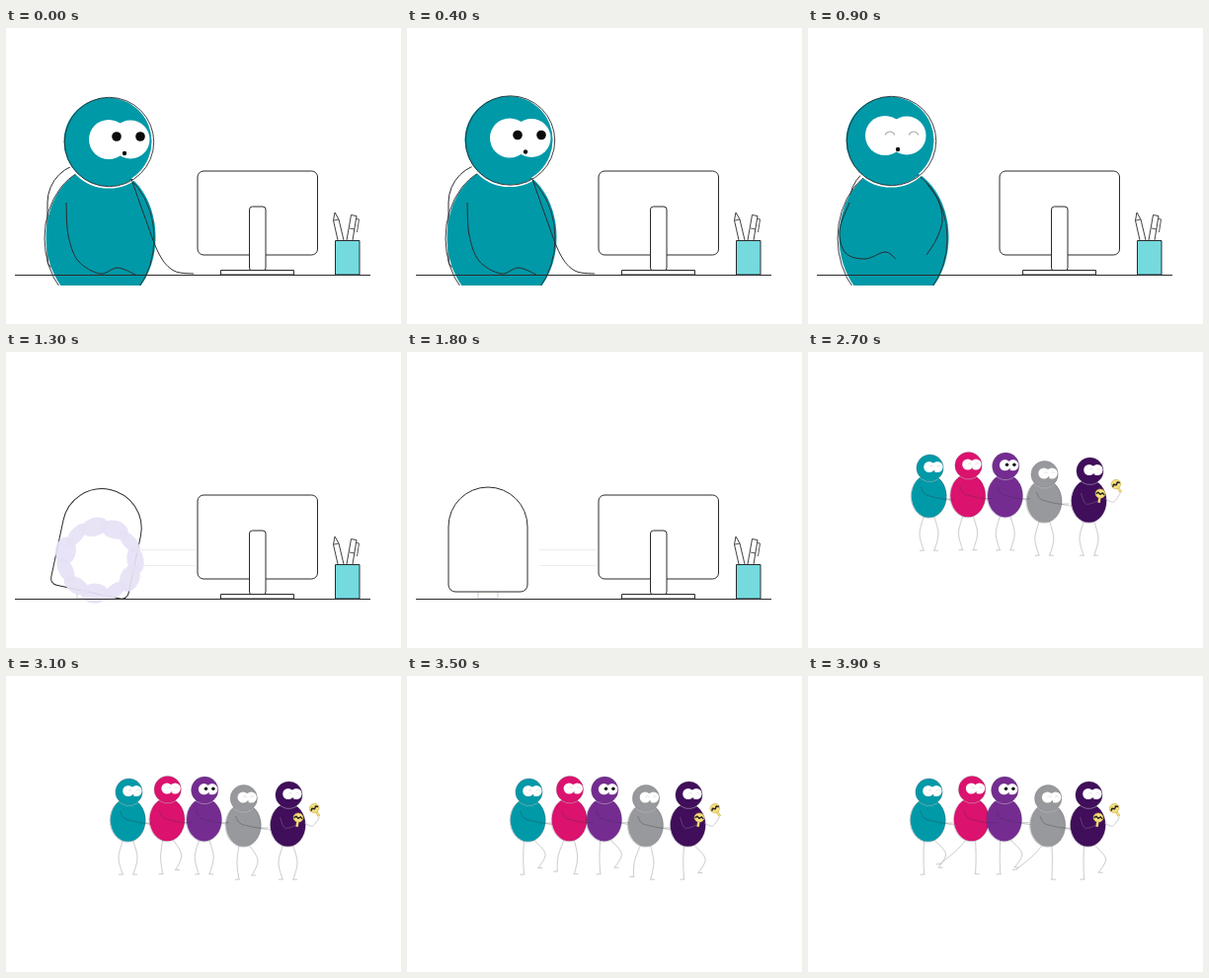
An HTML page with a canvas for the animation above (4000 ms loop, 400x300 px).

```html
<!DOCTYPE html>
<html lang="en">
<head>
<meta charset="utf-8">
<title>Conga break</title>
<style>
  html, body { margin: 0; width: 100%; height: 100%; overflow: hidden; background: #fff; }
  canvas { display: block; width: 400px; height: 300px; }
</style>
</head>
<body>
<canvas id="stage" width="400" height="300"></canvas>
<script>
const ctx = document.getElementById('stage').getContext('2d');
const LOOP = 4000, STEP = 100;
const INK = '#2b2b2e', TEAL = '#0099a8';

const clamp = v => Math.max(0, Math.min(1, v));
const ease = (t, from, to) => { const p = clamp((t - from) / (to - from)); return p * p * (3 - 2 * p); };
const mix = (a, b, p) => a + (b - a) * p;
const mixPoints = (a, b, p) => a.map((q, i) => [mix(q[0], b[i][0], p), mix(q[1], b[i][1], p)]);

function paint(fill, stroke, width = 1) {
  if (fill) { ctx.fillStyle = fill; ctx.fill(); }
  if (stroke) { ctx.strokeStyle = stroke; ctx.lineWidth = width; ctx.stroke(); }
}
function oval(x, y, rx, ry, fill, stroke, width) {
  ctx.beginPath();
  ctx.ellipse(x, y, rx, ry, 0, 0, Math.PI * 2);
  paint(fill, stroke, width);
}
const dot = (x, y, r, fill, stroke, width) => oval(x, y, r, r, fill, stroke, width);
function box(x, y, w, h, r, fill, stroke) {
  ctx.beginPath();
  ctx.roundRect(x, y, w, h, r);
  paint(fill, stroke);
}
function lines(points, stroke, width, fill) {
  ctx.beginPath();
  points.forEach(p => ctx.lineTo(...p));
  paint(fill, stroke, width);
}
// Smooth line through all points
function curve(points, stroke, width) {
  const at = i => points[Math.max(0, Math.min(points.length - 1, i))];
  ctx.beginPath();
  ctx.moveTo(...points[0]);
  for (let i = 0; i < points.length - 1; i++) {
    const [a, b, c, d] = [at(i - 1), at(i), at(i + 1), at(i + 2)];
    ctx.bezierCurveTo(b[0] + (c[0] - a[0]) / 6, b[1] + (c[1] - a[1]) / 6,
      c[0] - (d[0] - b[0]) / 6, c[1] - (d[1] - b[1]) / 6, ...c);
  }
  paint(null, stroke, width);
}
function lid(x, y, r, color, width) {
  ctx.beginPath();
  ctx.arc(x, y, r, Math.PI * 1.1, Math.PI * 1.9);
  paint(null, color, width);
}

function drawChair(t) {
  const swing = t < 1300 ? 12 * ease(t, 1000, 1200)
    : 12 * Math.exp((1300 - t) / 150) * Math.cos((t - 1300) / 200 * Math.PI);
  box(72, 240, 20, 10, 1, '#fff', '#c9c9d2');
  ctx.save();
  ctx.translate(82, 250);
  ctx.rotate(swing * Math.PI / 180);
  box(-40, -113, 80, 106, [40, 40, 7, 7], '#fff', INK);
  ctx.restore();
}

const ARMS = {
  rest: [[[61, 177], [63, 210], [73, 236], [95, 249], [113, 243], [131, 250]],
         [[127, 153], [140, 190], [155, 229], [170, 246], [190, 249]]],
  lean: [[[42, 177], [32, 205], [38, 228], [58, 234], [78, 227], [89, 234]],
         [[120, 157], [132, 175], [136, 195], [130, 214], [120, 230]]]
};

function drawWorker(t) {
  const lean = ease(t, 600, 900);
  ctx.save();
  ctx.beginPath();
  ctx.rect(0, 0, 400, 261);
  ctx.clip();
  ctx.translate(-170 * clamp((t - 1000) / 200) ** 1.4, 0);

  const bx = 96 - 9 * lean;
  oval(bx, 212, 55.5, 72, TEAL);
  oval(bx - 1.5, 213, 55.5, 72, null, INK, .9);

  const hx = 103 - 20 * lean, hy = 115 - lean - 2 * Math.sin(Math.PI * clamp(t / 600)) ** 2;
  dot(hx + 1, hy + 1, 45.5, null, '#fff', 2);
  dot(hx, hy, 44.5, TEAL);
  dot(hx + 1.5, hy + .5, 45.2, null, INK, .9);

  const ex = hx + 1 - 6 * lean, ey = hy - 2 - 3 * lean;
  dot(ex, ey, 20, '#fff');
  dot(ex + 22, ey, 19.5, '#fff');
  for (const x of [ex + 8, ex + 32]) {
    if (lean > .5) lid(x - 3, ey + 1, 5, '#aaa', 1.2);
    else dot(x, ey - 3, 4.8, '#0b0b0b');
  }
  dot(ex + 16 - 3 * lean, ey + 14, 2.2, '#111');

  ARMS.rest.forEach((arm, i) => curve(mixPoints(arm, ARMS.lean[i], lean), INK, 1));
  ctx.restore();
}

function drawPuff(t) {
  const age = (t - 1300) / 100, count = 11;
  const size = 1 - .25 * Math.max(0, age);
  if (size <= 0) return;
  ctx.save();
  ctx.globalAlpha = .92 * size;
  for (let i = 0; i < count; i++) {
    const a = i / count * Math.PI * 2, spread = 1 + .06 * age;
    ctx.beginPath();
    ctx.ellipse(95 + 36 * spread * Math.cos(a), 211 + 34 * spread * Math.sin(a),
      14 * size, (8.5 + 2 * Math.sin(i * 2.4)) * size, a + 1.4, 0, Math.PI * 2);
    paint('#e6e1f5');
  }
  ctx.restore();
}

function drawDesk() {
  lines([[9, 250.5], [369, 250.5]], INK, 1);
  box(194, 145, 121.5, 85, 6, '#fff', INK);
  box(246.5, 181, 16.5, 65, 3, '#fff', INK);
  box(217.5, 245.5, 74, 4.5, 0, '#fff', INK);
  lines([[336, 215], [331.5, 195], [333, 187], [337, 194], [342, 215]], INK, .9, '#fff');
  lines([[332, 195], [337, 194]], INK, .8);
  lines([[345, 215], [349.5, 189.5], [355, 190.5], [351, 215]], INK, .9, '#fff');
  lines([[348, 203], [353, 204]], INK, .8);
  lines([[355, 193], [357.5, 194], [355.5, 207]], INK, .8);
  box(334, 216, 24, 34, 0, '#74dade');
  box(333.5, 215.5, 24.5, 34.5, 0, null, INK);
}

function drawOffice(t) {
  drawChair(t);
  if (t < 1200) drawWorker(t);
  else {
    for (const y of [200.5, 216.5]) lines([[134, y], [192, y]], '#ececef', 1);
    drawPuff(t);
  }
  drawDesk();
}

const LEGS = {
  stand: [[5, 20], [9.5, 38], [5.5, 55]],
  straight: [[4, 20], [4.5, 38], [4, 55]],
  raise: [[6, 20], [18, 34], [11, 48]],
  kick: [[5, 20], [16, 32], [32, 45]]
};
// beat: time of a right-leg lift; walks: strides forward and ends on a left kick, others sway
const DANCERS = [
  { x: 122.5, y: 146, color: TEAL, head: [1, -28.5], beat: 2450, enters: true },
  { x: 162, y: 145.5, color: '#dc126f', head: [.5, -30.5], beat: 2250, walks: true },
  { x: 199.7, y: 145.7, color: '#752c91', head: [.5, -30], beat: 2450, awake: true },
  { x: 239.3, y: 151, color: '#97999c', head: [.3, -27], beat: 2250, walks: true },
  { x: 284.5, y: 151, color: '#400e5b', head: [1, -30.5], beat: 2450, leader: true }
];
const THIN = '#bdbdc2', EDGE = 'rgba(50, 50, 60, .4)';

function placeX(d, t) {
  const move = d.walks ? .003 * (t - 2700) : Math.sin((t - 2700) / 800 * Math.PI);
  return d.x + move - (d.enters ? 130 * (1 - clamp((t - 2400) / 300)) : 0);
}

function drawLeg(side, points) {
  const p = points.map(([x, y]) => [x * side, y]), foot = p[2];
  curve(p, THIN, .8);
  lines([[foot[0] - side, foot[1]], [foot[0] + 4 * side, foot[1] + .3]], THIN, .8);
}

function drawMaraca(x, y, angle) {
  ctx.save();
  ctx.translate(x, y);
  ctx.rotate(angle);
  lines([[0, 3], [0, 9.5]], '#c2a850', 2.6);
  lines([[0, 3], [0, 9]], '#f6df7c', 1.8);
  oval(0, 0, 5, 4.6, '#f6df7c', '#c2a850', .5);
  lines([[-4.2, .8], [-2.2, -1], [0, .8], [2.2, -1], [4.2, .8]], '#222', 1.4);
  ctx.restore();
}

function drawDancer(d, t) {
  const finale = ease(t, 3400, 3700);
  const lift = Math.max(0, Math.cos((t - d.beat) / 500 * Math.PI));
  const right = d.walks ? lift * (1 - finale) : Math.max(lift, finale);
  const left = d.walks ? finale : 0;

  ctx.save();
  ctx.translate(placeX(d, t), d.y);
  drawLeg(-1, mixPoints(mixPoints(LEGS.stand, LEGS.straight, right), LEGS.kick, left));
  drawLeg(1, mixPoints(mixPoints(LEGS.stand, LEGS.straight, left), LEGS.raise, right));
  if (!d.leader) curve([[12, 0], [20, 4], [28, 5]], THIN, .7);

  oval(0, 0, 17.8, 21.8, d.color);
  oval(-.3, .3, 18, 21.9, null, EDGE, .6);
  const [hx, hy] = d.head;
  dot(hx, hy, 13.6, d.color);
  dot(hx, hy, 13.7, null, EDGE, .6);
  ctx.beginPath();
  ctx.arc(hx, hy, 14, .6, Math.PI - .6);
  paint(null, 'rgba(255, 255, 255, .5)', .7);

  for (const x of [hx - .7, hx + 7.5]) dot(x, hy - 1, 5.6, '#fff');
  for (const x of [hx + 1.3, hx + 8.7]) {
    if (d.awake) dot(x, hy - 1.5, 1.7, '#111');
    else lid(x, hy - .5, 1.8, '#c6c6ca', .5);
  }
  dot(hx + 4.2, hy + 3, .7, '#777');

  if (d.leader) {
    const shake = Math.sin(t / 400 * Math.PI);
    curve([[-8, -8], [-3, 3], [9, 0]], '#77608a', .6);
    curve([[17, -2], [25, 1], [32, -8]], THIN, .8);
    drawMaraca(11 + shake * .7, -7.5, .15);
    drawMaraca(27 + shake * .5, -17, -.55);
  }
  ctx.restore();
}

function drawFrontArm(d, t) {
  ctx.save();
  ctx.translate(placeX(d, t), d.y);
  curve([[-8, -9], [-4, -2], [5, 1], [15, 3], [25, 3]], 'rgba(50, 50, 60, .55)', .6);
  ctx.restore();
}

function drawConga(t) {
  const crew = DANCERS.filter(d => !d.enters || t >= 2500);
  crew.forEach(d => drawDancer(d, t));
  crew.filter(d => !d.leader).forEach(d => drawFrontArm(d, t));
}

const start = performance.now();
function frame() {
  const t = Math.floor((performance.now() - start) % LOOP / STEP) * STEP;
  ctx.fillStyle = '#fff';
  ctx.fillRect(0, 0, 400, 300);
  ctx.lineJoin = 'round';
  if (t < 1900) drawOffice(t);
  else drawConga(t);
  requestAnimationFrame(frame);
}
frame();
</script>
</body>
</html>
```
